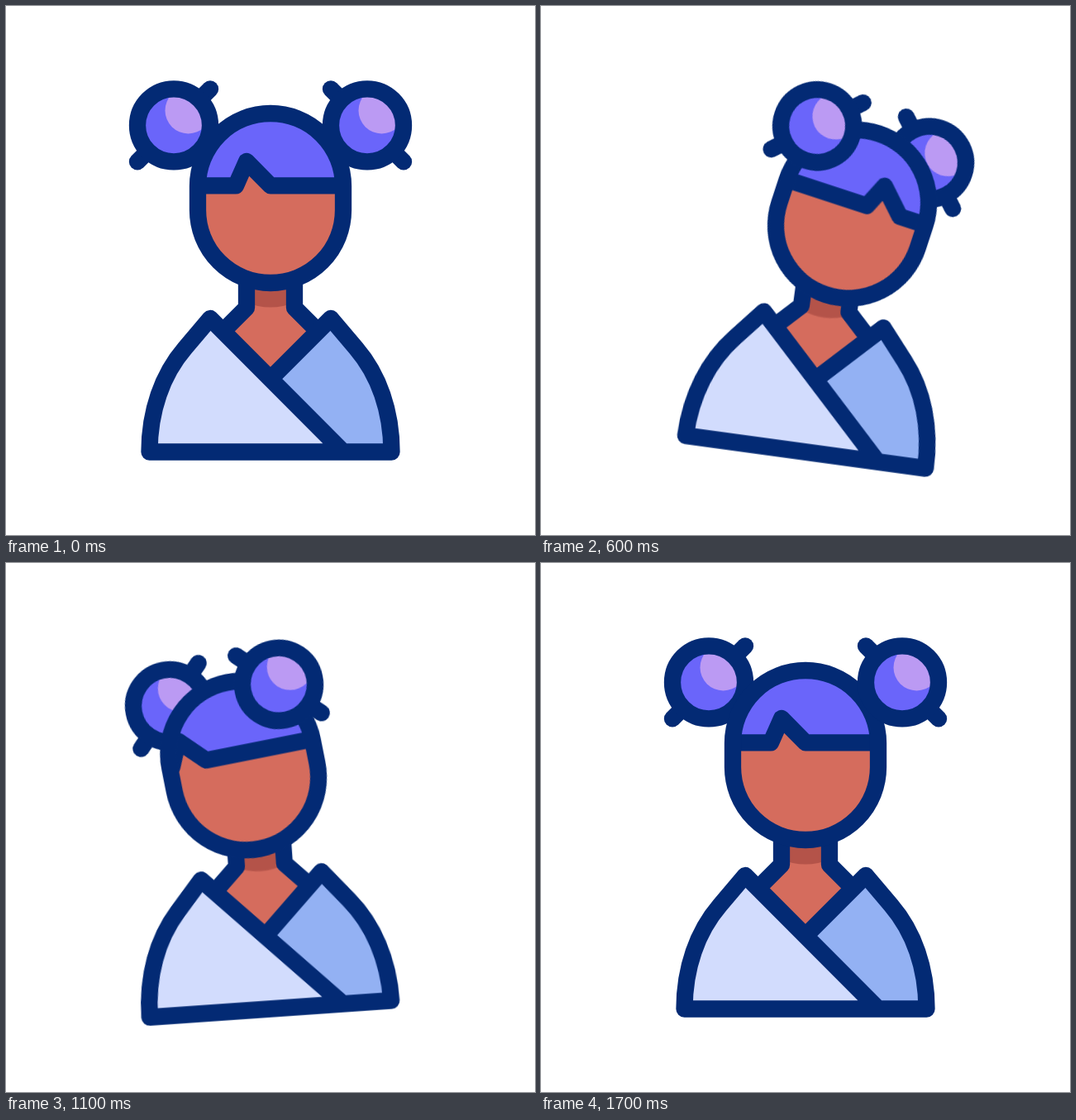
Write an HTML page that moves like this. It is 640x640 px and loops after 2.4 s.

```html
<!DOCTYPE html>
<html lang="en">
<head>
<meta charset="utf-8">
<title>Woman with hair buns</title>
<style>
  html, body { margin: 0; width: 100%; height: 100%; overflow: hidden; background: #fff; }
  svg { display: block; width: 100%; height: 100%; }

  .line { fill: none; stroke: #032a74; stroke-width: 20.3; stroke-linecap: round; stroke-linejoin: round; }
  .skin { fill: #d56c5d; }
  .shade { fill: #b45349; }
  .hair { fill: #6a65fa; }
  .shine { fill: #bb9af3; }
  .robe { fill: #d2dcfd; }
  .robe-far { fill: #93b1f3; }

  .body, .nod, .bob, .shade, .fringe, .left, .right {
    animation: 2400ms cubic-bezier(.3333, 0, .6667, 1) infinite;
  }
  .body { transform-origin: 320px 539.5px; animation-name: sway; }
  .nod { transform-origin: 320px 340px; animation-name: nod; }
  .bob { animation-name: bob; }
  .shade { animation-name: shade; }
  .fringe { animation-name: fringe; }
  .left { animation-name: left; }
  .right { animation-name: right; }
  .early { animation: early 2400ms step-end infinite; }
  .late { animation: late 2400ms step-end infinite; }

  @keyframes sway {
    0%, 70.833%, 100% { transform: rotate(0deg); }
    20% { transform: rotate(9deg); }
    46.667% { transform: rotate(-4deg); }
  }
  @keyframes nod {
    0%, 70.833%, 100% { transform: rotate(0deg); }
    20% { transform: rotate(12.2deg); }
    46.667% { transform: rotate(-7.3deg); }
  }
  @keyframes bob {
    0%, 69.167%, 100% { transform: translateY(0); }
    32.5% { transform: translateY(14.7px); }
  }
  @keyframes shade {
    0%, 70.833%, 100% { transform: translateY(0); }
    20% { transform: translateY(11px); }
    46.667% { transform: translateY(7.7px); }
  }
  /* The head turns: the fringe crosses the face while the buns close in. */
  @keyframes fringe {
    0%, 70.833%, 100% { transform: translateX(0); }
    20% { transform: translateX(66.5px); }
    45.833% { transform: translateX(-43px); }
  }
  @keyframes left {
    0%, 33.333%, 70.833%, 100% { transform: translateX(0); }
    20% { transform: translateX(64px); }
    45.833% { transform: translateX(43.5px); }
  }
  @keyframes right {
    0%, 33.333%, 70.833%, 100% { transform: translateX(0); }
    20% { transform: translateX(-70px); }
    45.833% { transform: translateX(-56px); }
  }
  /* Each bun swaps between front and back when the turn changes sides. */
  @keyframes early {
    0% { opacity: 1; }
    33.333%, 100% { opacity: 0; }
  }
  @keyframes late {
    0% { opacity: 0; }
    33.333%, 100% { opacity: 1; }
  }
</style>
</head>
<body>
<svg viewBox="0 0 640 640" role="img" aria-label="Woman with hair buns">
  <defs>
    <path id="head" d="M232 218a88 88 0 0 1 176 0v29a88 88 0 0 1-176 0z"/>
    <path id="neck" d="M291 330V365L263 393L320 451L377 393L349 365V330z"/>
    <clipPath id="in-head"><use href="#head"/></clipPath>
    <clipPath id="in-neck"><use href="#neck"/></clipPath>
    <clipPath id="in-bun"><circle r="44"/></clipPath>

    <g id="bun">
      <circle class="hair" r="44"/>
      <circle class="shine" cx="17.5" cy="-18" r="28" clip-path="url(#in-bun)"/>
      <circle class="line" r="44"/>
    </g>
    <g id="bun-left" transform="translate(203 144.4)">
      <path class="line" d="M44 -44L-44 44"/>
      <use href="#bun"/>
    </g>
    <g id="bun-right" transform="translate(437 144.4)">
      <path class="line" d="M-44 -44L44 44"/>
      <use href="#bun"/>
    </g>
  </defs>

  <g class="body">
    <use href="#neck" class="skin"/>
    <g clip-path="url(#in-neck)"><circle class="shade" cx="320" cy="286.5" r="78"/></g>
    <path class="line" d="M291 330V365L263 393M349 330V365L377 393"/>
    <path class="robe-far" d="M320 451L393 378L423.5 414C451 446 466.5 490 466.5 539.5H408z"/>
    <path class="robe" d="M247 378L216.500 414C189 446 173.500 490 173.500 539.500H408z"/>
    <path class="line" d="M320 451L393 378L423.500 414C451 446 466.500 490 466.500 539.500H173.500C173.500 490 189 446 216.500 414L247 378L408 539.500"/>

    <g class="nod">
      <g class="bob">
        <g class="late"><use href="#bun-left" class="left"/></g>
        <g class="early"><use href="#bun-right" class="right"/></g>

        <use href="#head" class="skin"/>
        <g clip-path="url(#in-head)">
          <g class="fringe">
            <path class="hair" d="M100 100V217.300H278L291 188L320 217.300H540V100z"/>
            <path class="line" d="M100 217.300H278L291 188L320 217.300H540"/>
          </g>
        </g>
        <use href="#head" class="line"/>

        <g class="early"><use href="#bun-left" class="left"/></g>
        <g class="late"><use href="#bun-right" class="right"/></g>
      </g>
    </g>
  </g>
</svg>
</body>
</html>
```
